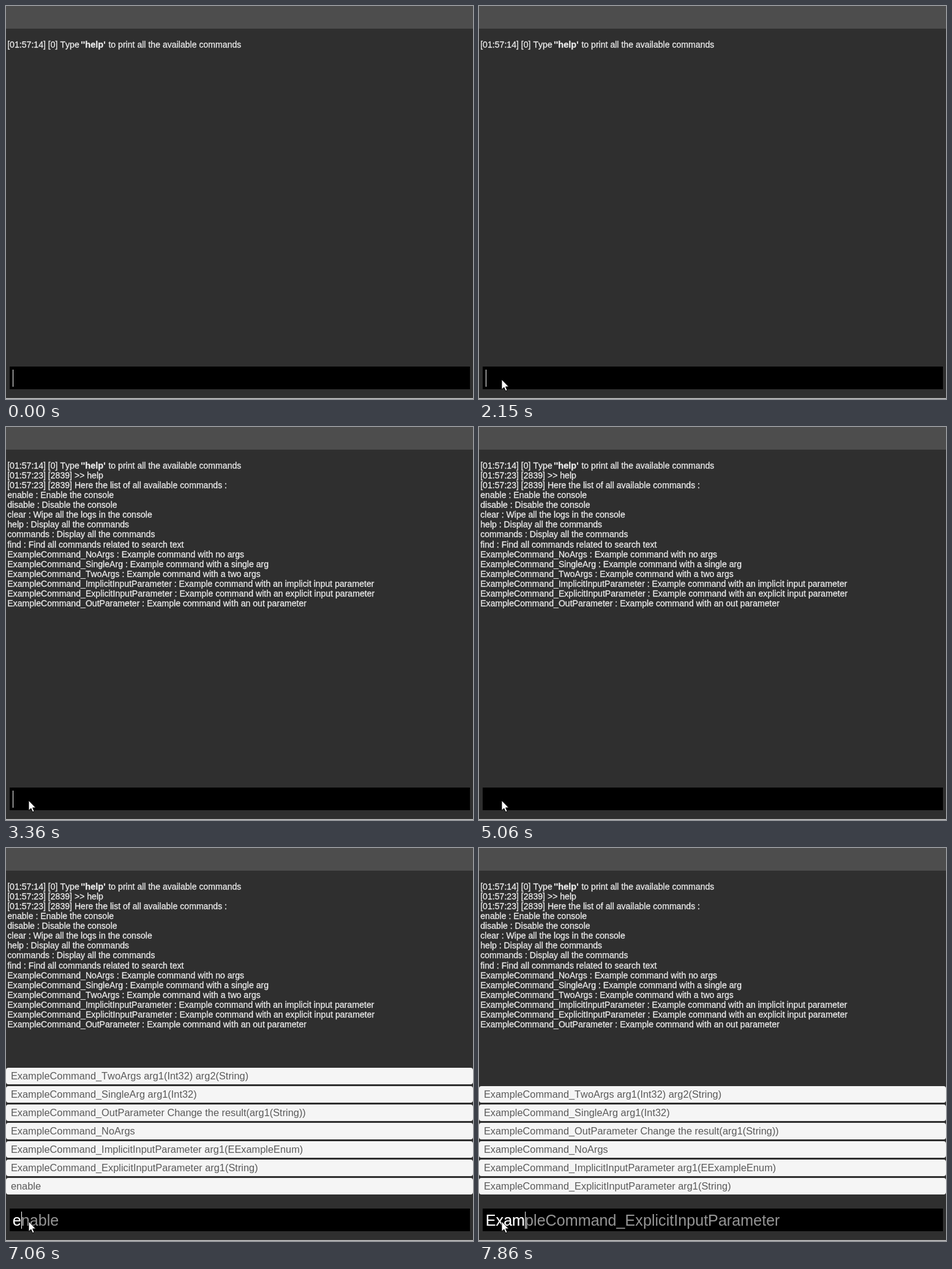
Animation of 763x642 px, one loop 8 s. Source, as an HTML page with a canvas:

```html
<!DOCTYPE html>
<html lang="en">
<head>
<meta charset="utf-8">
<title>Console</title>
<style>
  html, body { margin: 0; width: 100%; height: 100%; overflow: hidden; background: #2f2f2f; }
  canvas { display: block; }
</style>
</head>
<body>
<canvas id="stage" width="763" height="642"></canvas>
<script>
const W = 763, H = 642, LOOP = 8000;
const ctx = document.getElementById('stage').getContext('2d');
const FACE = '"Liberation Sans", Arial, sans-serif';

const LOG = [
  '[01:57:23] [2839] >> help',
  '[01:57:23] [2839] Here the list of all available commands :',
  'enable : Enable the console',
  'disable : Disable the console',
  'clear : Wipe all the logs in the console',
  'help : Display all the commands',
  'commands : Display all the commands',
  'find : Find all commands related to search text',
  'ExampleCommand_NoArgs : Example command with no args',
  'ExampleCommand_SingleArg : Example command with a single arg',
  'ExampleCommand_TwoArgs : Example command with a two args',
  'ExampleCommand_ImplicitInputParameter : Example command with an implicit input parameter',
  'ExampleCommand_ExplicitInputParameter : Example command with an explicit input parameter',
  'ExampleCommand_OutParameter : Example command with an out parameter'
];

// Listed from the bottom row up
const EXAMPLES = [
  'ExampleCommand_ExplicitInputParameter arg1(String)',
  'ExampleCommand_ImplicitInputParameter arg1(EExampleEnum)',
  'ExampleCommand_NoArgs',
  'ExampleCommand_OutParameter Change the result(arg1(String))',
  'ExampleCommand_SingleArg arg1(Int32)',
  'ExampleCommand_TwoArgs arg1(Int32) arg2(String)'
];
const FULL = 'ExampleCommand_ExplicitInputParameter';

// Input states: start time, typed text, completion, suggestions
const INPUT = [
  [0, '', '', []],
  [2220, 'h', 'help', ['help']],
  [2320, 'he', 'help', ['help']],
  [2410, 'hel', 'help', ['help']],
  [2950, 'help', 'help', ['help']],
  [3360, '', '', []],
  [7060, 'e', 'enable', ['enable', ...EXAMPLES]],
  [7270, 'Ex', FULL, EXAMPLES],
  [7760, 'Exa', FULL, EXAMPLES],
  [7860, 'Exam', FULL, EXAMPLES]
];
const BLINKS = [380, 950, 1520, 2150, 3920, 4490, 5060, 5630, 6210, 6770];
const ARROW = [[0, 0], [0, 16.5], [3.8, 13], [6.5, 19], [9.2, 17.8], [6.6, 12], [11.6, 12]];

function rect(x, y, w, h, color) {
  ctx.fillStyle = color;
  ctx.fillRect(x, y, w, h);
}

function text(str, x, y, size, color, weight = '') {
  ctx.font = `${weight} ${size}px ${FACE}`;
  ctx.fillStyle = color;
  ctx.fillText(str, x, y);
}

function logText(str, x, y, size = 14.1, weight) {
  text(str, x, y, size, '#ebebeb', weight);
  ctx.lineWidth = 0.3;
  ctx.strokeStyle = '#ebebeb';
  ctx.strokeText(str, x, y);
}

function drawLog(t) {
  logText('[01:57:14] [0] Type', 2.2, 68);
  logText("''help'", 122.3, 68, 14.6, 'bold');
  logText('to print all the available commands', 167.4, 68);
  if (t >= 3360) LOG.forEach((line, i) => logText(line, 2.2, 68 + (i + 1) * 16.07));
}

function drawSuggestions(items) {
  items.forEach((item, i) => {
    const y = 539 - i * 30;
    ctx.fillStyle = '#f5f5f5';
    ctx.beginPath();
    ctx.roundRect(0, y, W, 27, 4);
    ctx.fill();
    text(item, 7.9, y + 19, 16.38, '#5a5a5a');
  });
}

function drawInput(t, typed, completion) {
  const x = 10.8, y = 617, size = 25.15;
  rect(6, 589, 752, 37, '#000');
  text(completion, x, y, size, '#959595');
  text(typed, x, y, size, '#fff');
  const toggles = BLINKS.filter(b => b <= t).length;
  if (toggles % 2 === 0) rect(11 + ctx.measureText(typed).width, 594, 1, 28, '#fff');
}

function pointerAt(t) {
  if (t < 780) return null;
  if (t >= 1570) return [37, 610];
  if (t >= 1520) return [38, 608];
  const step = Math.min(14, Math.floor((t - 780) / 27.1));
  const p = (step + 1) / 15, ease = 1 - (1 - p) ** 2;
  return [31 + 9 * ease, 642 - 36 * ease];
}

function drawPointer(t) {
  const pos = pointerAt(t);
  if (!pos) return;
  ctx.beginPath();
  for (const [x, y] of ARROW) ctx.lineTo(pos[0] + x, pos[1] + y);
  ctx.closePath();
  ctx.lineWidth = 1;
  ctx.strokeStyle = '#000';
  ctx.fillStyle = '#fff';
  ctx.fill();
  ctx.stroke();
}

function draw(t) {
  const [, typed, completion, items] = INPUT.filter(s => s[0] <= t).pop();
  rect(0, 0, W, H, '#2f2f2f');
  rect(0, 0, W, 37, '#4d4d4d');
  rect(0, 640.7, W, 1.3, '#dedede');
  drawLog(t);
  drawSuggestions(items);
  drawInput(t, typed, completion);
  drawPointer(t);
}

ctx.fontKerning = 'none';
const start = performance.now();
function tick() {
  draw((performance.now() - start) % LOOP);
  requestAnimationFrame(tick);
}
tick();
</script>
</body>
</html>
```
